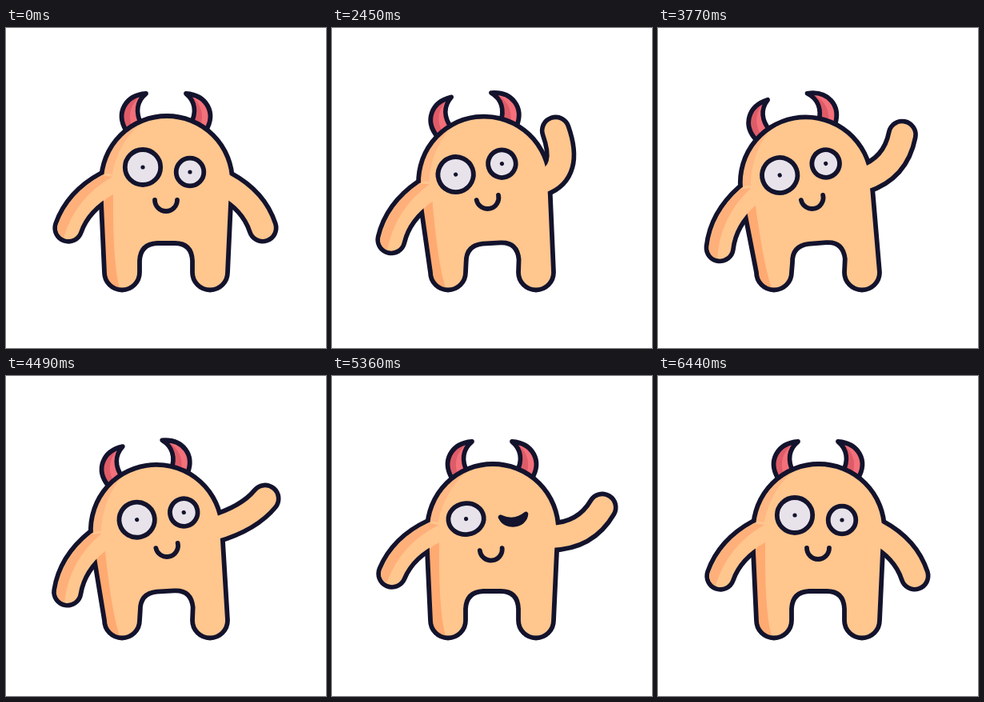
Recreate the animation shown at these times as an HTML page with a canvas. Size 400 by 400 pixels, loop 6470 ms.

```html
<!DOCTYPE html>
<html lang="en">
<head>
<meta charset="utf-8">
<title>Waving monster</title>
<style>
html, body { margin: 0; width: 100%; height: 100%; overflow: hidden; background: #fff; }
canvas { display: block; width: 100vw; height: 100vh; }
</style>
</head>
<body>
<canvas id="stage" width="400" height="400"></canvas>
<script>
const ctx = document.getElementById('stage').getContext('2d');
const INK = '#13132d', SKIN = '#ffc68e', EYE = '#e8e3eb';
const HEAD_SHADE = '#ffb783', ARM_SHADE = '#ffb07a', TORSO_SHADE = '#ffaa71';
const HORN = '#de5c68', HORN_LIGHT = '#f4707a';
const LOOP = 6470, START = 2030, STEP = 30, WAVE = 600, LINE = 5.8;
const PIVOT = [200, 279], TAU = Math.PI * 2;

const rad = d => d * Math.PI / 180;
const mix = (a, b, k) => a + (b - a) * k;
const smooth = (a, b, t) => {
  const k = Math.min(1, Math.max(0, (t - a) / (b - a)));
  return k * k * (3 - 2 * k);
};
const window01 = (a, b, c, d, t) => smooth(a, b, t) * (1 - smooth(c, d, t));

function turn([x, y], deg, [cx, cy] = PIVOT) {
  const c = Math.cos(rad(deg)), s = Math.sin(rad(deg));
  return [cx + (x - cx) * c - (y - cy) * s, cy + (x - cx) * s + (y - cy) * c];
}

// Cosine of the wave cycle, peaking at the given phase
const swing = (t, peak) => Math.cos(TAU * ((t - 2930) / WAVE - peak));

function poseAt(t) {
  const body = window01(2000, 2450, 5000, 5350, t);
  const face = window01(2000, 2450, 5000, 5700, t);
  const arm = window01(2000, 2400, 5320, 5960, t);
  const sway = swing(t, .33);
  const reach = swing(Math.min(t, 5096), .61);
  const settle = smooth(5050, 5350, t);
  const wink = window01(5190, 5290, 5530, 5650, t);
  const stretch = t < 4000 ? -8 : 6;
  return {
    lean: body * (-6.7 - 4.08 * swing(t, .43)),
    horn: -2.5 * sway * body,
    leftArm: body * (-6 - 7.4 * swing(t, .45)) + 3.3 * window01(5050, 5340, 5420, 5900, t),
    raise: arm,
    hand: {
      angle: mix(48.4, -52.2 + 25.3 * reach, arm),
      length: mix(72, 69 + 6 * reach - 3 * reach * reach, arm) + stretch * Math.sin(Math.PI * arm)
    },
    elbow: [mix(37, 39.5 + 4.5 * reach, arm), mix(20, -10 + 12 * settle, arm)],
    eyes: [mix(200.5, 191.5 - 11.65 * sway, face), mix(177, 175.3 + 1.6 * sway, face) + 2 * wink],
    tilt: face * (-15.3 - 5.24 * sway),
    mouth: [mix(200, 200 - 8.25 * sway, face) - 2 * wink, mix(215, 212, face) + 3 * wink],
    mouthTilt: -13 * face,
    wink
  };
}

function ink(path) {
  ctx.lineWidth = LINE;
  ctx.strokeStyle = INK;
  path ? ctx.stroke(path) : ctx.stroke();
}

function strokeArm({ from, bend, to }, color, width) {
  ctx.beginPath();
  ctx.moveTo(...from);
  ctx.quadraticCurveTo(...bend, ...to);
  ctx.lineWidth = width;
  ctx.strokeStyle = color;
  ctx.stroke();
}

function armsOf(p) {
  const left = turn([127, 196], p.lean), right = turn([273, 196], p.lean);
  const a = rad(p.hand.angle), r = p.hand.length;
  const offset = (x, y) => turn([left[0] + x, left[1] + y], p.leftArm, left);
  return {
    left: { from: left, bend: offset(-37, 20), to: offset(-49, 54) },
    right: {
      from: [right[0], right[1] + 5 * p.raise],
      bend: [right[0] + p.elbow[0], right[1] + p.elbow[1] + 2 * p.raise],
      to: [right[0] + r * Math.cos(a), right[1] + r * Math.sin(a)]
    }
  };
}

function shadeArm([x, y], deg) {
  ctx.save();
  ctx.translate(x, y);
  ctx.rotate(rad(deg));
  ctx.beginPath();
  ctx.moveTo(6, -10);
  ctx.lineTo(-7, -12);
  ctx.quadraticCurveTo(-47, 9.5, -62, 50);
  ctx.quadraticCurveTo(-65, 61, -55, 66);
  ctx.quadraticCurveTo(-40, 16, 6, -10);
  ctx.fillStyle = ARM_SHADE;
  ctx.fill();
  ctx.restore();
}

function drawHorn(p, side) {
  const horn = new Path2D();
  horn.moveTo(-8, 6);
  horn.bezierCurveTo(-21, -16, -9, -38, 17, -40);
  horn.bezierCurveTo(5, -30, 4, -16, 11, -2);
  horn.closePath();
  ctx.save();
  ctx.translate(...PIVOT);
  ctx.rotate(rad(p.lean));
  ctx.translate(side * 42, -157);
  ctx.rotate(rad(p.horn));
  ctx.scale(-side, 1);
  ctx.fillStyle = HORN;
  ctx.fill(horn);
  ctx.save();
  ctx.clip(horn);
  ctx.beginPath();
  ctx.moveTo(-side * 22, 8);
  ctx.lineTo(2, 8);
  ctx.bezierCurveTo(-8, -12, -3, -28, 14, -40);
  ctx.lineTo(-side * 22, -42);
  ctx.fillStyle = HORN_LIGHT;
  ctx.fill();
  ctx.restore();
  ink(horn);
  ctx.restore();
}

function bodyPath(lean) {
  const up = (x, y) => turn([x, y], lean);
  const mid = (x, y) => turn([x, y], lean * .4);
  const path = new Path2D();
  path.moveTo(...up(119, 219));
  path.lineTo(...up(119, 192));
  path.arc(...up(201, 192), 82, Math.PI + rad(lean), TAU + rad(lean));
  path.lineTo(...up(281, 219));
  path.lineTo(277, 305.5);
  path.arc(255, 305.5, 22, 0, Math.PI);
  path.lineTo(...mid(233, 291));
  path.quadraticCurveTo(...mid(232, 269), ...mid(211, 269));
  path.lineTo(...mid(189, 269));
  path.quadraticCurveTo(...mid(168, 270), ...mid(167, 291));
  path.lineTo(167, 305.5);
  path.arc(145, 305.5, 22, 0, Math.PI);
  path.closePath();
  return path;
}

function drawBody(lean) {
  const up = (x, y) => turn([x, y], lean);
  const path = bodyPath(lean);
  ctx.fillStyle = SKIN;
  ctx.fill(path);
  ctx.save();
  ctx.clip(path);
  ctx.fillStyle = HEAD_SHADE;
  ctx.beginPath();
  ctx.moveTo(...up(178, 112));
  ctx.quadraticCurveTo(...up(140, 139), ...up(132, 186));
  ctx.lineTo(...up(100, 190));
  ctx.lineTo(...up(100, 105));
  ctx.fill();
  ctx.fillStyle = TORSO_SHADE;
  ctx.beginPath();
  ctx.moveTo(...up(116, 222));
  ctx.lineTo(...up(134, 205));
  ctx.quadraticCurveTo(133, 305, 144, 330);
  ctx.lineTo(105, 330);
  ctx.fill();
  ctx.restore();
  ink(path);
}

function drawEye(x, y, rx, ry) {
  ctx.beginPath();
  ctx.ellipse(x, y, rx, ry, 0, 0, TAU);
  ctx.fillStyle = EYE;
  ctx.fill();
  ink();
  ctx.beginPath();
  ctx.arc(x, y, 2.6, 0, TAU);
  ctx.fillStyle = INK;
  ctx.fill();
}

function drawClosedEye(x, y) {
  ctx.beginPath();
  ctx.moveTo(x - 16, y - 3);
  ctx.quadraticCurveTo(x, y + 7, x + 16, y - 3);
  ctx.bezierCurveTo(x + 13, y + 12, x - 12, y + 12, x - 16, y - 3);
  ctx.fillStyle = INK;
  ctx.fill();
  ink();
}

function drawFace(p) {
  ctx.save();
  ctx.translate(...p.eyes);
  ctx.rotate(rad(p.tilt));
  drawEye(-29.5, -3, 22.2, 22 - 2.6 * p.wink);
  if (p.wink > .8) drawClosedEye(29.5, 3);
  else drawEye(29.5, 3, 17.3, 17.3 * (1 - p.wink));
  ctx.restore();

  ctx.save();
  ctx.translate(...p.mouth);
  ctx.rotate(rad(p.mouthTilt));
  ctx.beginPath();
  ctx.arc(0, 0, 14, 0, Math.PI);
  ink();
  ctx.restore();
}

function draw(t) {
  const p = poseAt(t), arms = armsOf(p);
  ctx.fillStyle = '#fff';
  ctx.fillRect(0, 0, 400, 400);
  ctx.lineCap = ctx.lineJoin = 'round';
  drawHorn(p, -1);
  drawHorn(p, 1);
  strokeArm(arms.left, INK, 39.4);
  strokeArm(arms.right, INK, 39.4);
  drawBody(p.lean);
  strokeArm(arms.left, SKIN, 28);
  shadeArm(arms.left.from, p.leftArm);
  strokeArm(arms.right, SKIN, 28);
  drawFace(p);
}

const origin = performance.now();
function frame() {
  const t = (performance.now() - origin) % LOOP;
  draw(t < START ? 0 : START + STEP * Math.floor((t - START) / STEP));
  requestAnimationFrame(frame);
}
frame();
</script>
</body>
</html>
```
